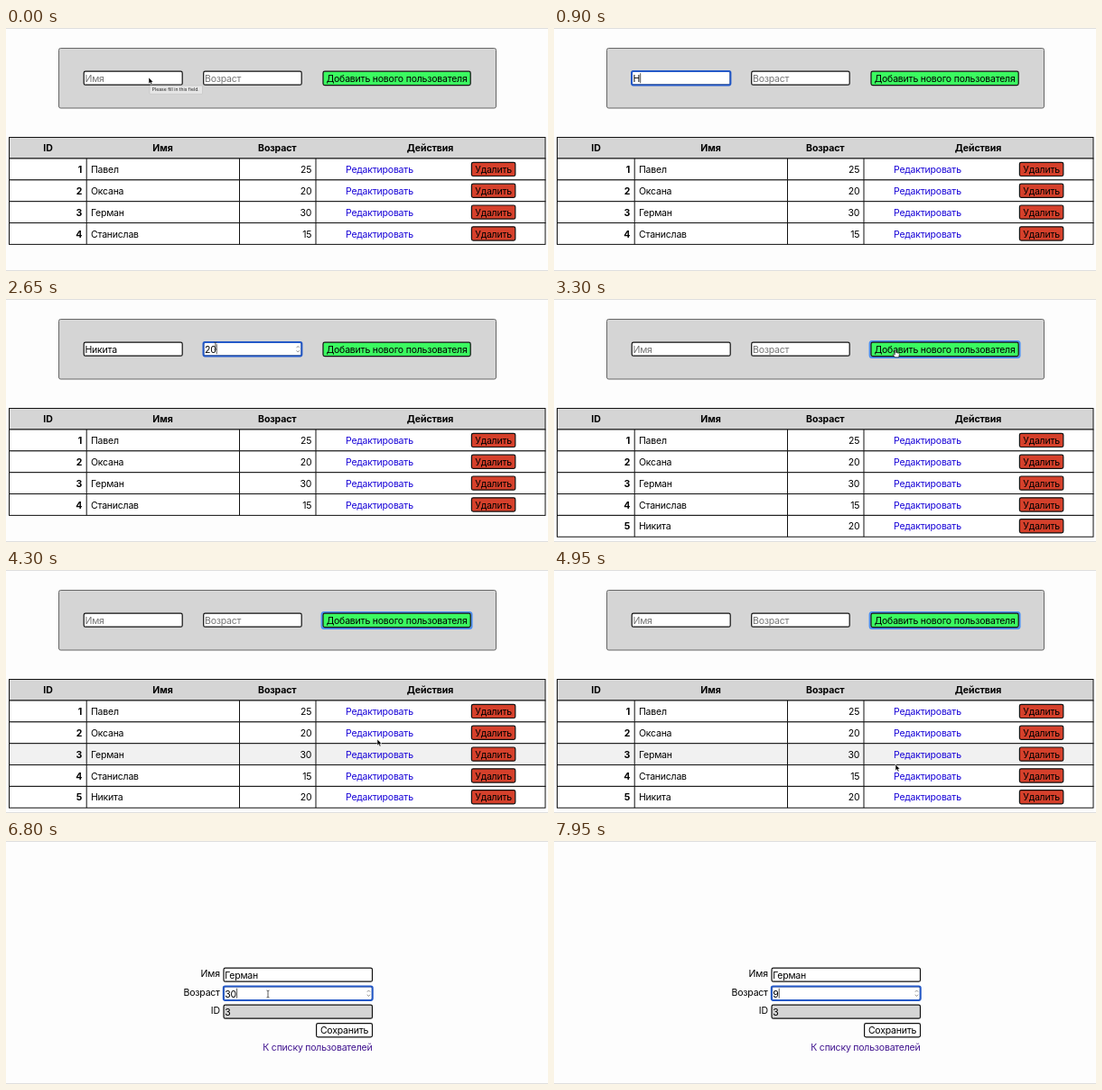
Write an HTML page that moves like this. It is 600 px wide and 270 px high and loops after 8 s.

```html
<!DOCTYPE html>
<html lang="ru">
<head>
<meta charset="utf-8">
<title>Список пользователей</title>
<style>
html, body { margin: 0; width: 100%; height: 100%; overflow: hidden; background: #fdfdfd; }
svg { display: block; width: 100%; height: 100%; }
text { font: 10.5px Inter, "Liberation Sans", sans-serif; letter-spacing: -.02em; fill: #000; white-space: pre; }
.bold { font-weight: 700; letter-spacing: -.01em; }
.hint { fill: #757575; }
.link { fill: #1a06d8; }
.visited { fill: #40148f; }
.tip { font-size: 5.1px; letter-spacing: 0; fill: #222; }
</style>
</head>
<body>
<svg id="stage" viewBox="0 0 600 270"></svg>
<script>
const LOOP = 8000;
const USERS = [["Павел", 25], ["Оксана", 20], ["Герман", 30], ["Станислав", 15], ["Никита", 20]];
const NEW_NAME = USERS[4][0];
const TOP = 145, ROW = 23.85;
const GREY = "#d5d5d5", RING = "#2459c8";

const stage = document.getElementById("stage");

function add(parent, tag, attrs, content) {
  const el = document.createElementNS("http://www.w3.org/2000/svg", tag);
  for (const k in attrs) el.setAttribute(k, attrs[k]);
  if (content !== undefined) el.textContent = content;
  parent.appendChild(el);
  return el;
}
const group = parent => add(parent, "g", {});
const label = (parent, x, y, s, cls = "", anchor = "start") =>
  add(parent, "text", { x, y, class: cls, "text-anchor": anchor }, s);
const box = (parent, x, y, width, height, fill, stroke = "none", weight = 1.2, rx = 1.8) =>
  add(parent, "rect", { x, y, width, height, fill, stroke, "stroke-width": weight, rx });
const line = (parent, x1, y1, x2, y2, stroke = "#111", weight = 1) =>
  add(parent, "line", { x1, y1, x2, y2, stroke, "stroke-width": weight });
const show = (el, on) => el.setAttribute("visibility", on ? "visible" : "hidden");

function button(parent, x, y, w, h, fill, s) {
  box(parent, x, y, w, h, fill, "#111");
  label(parent, x + w / 2, y + 11.7, s, "", "middle");
}

// An input with value, hint, focus ring, caret and optional number arrows.
function field(parent, x, y, w, hint, fill = "#fff") {
  const h = 15;
  box(parent, x, y, w, h, fill, "#111");
  const ring = box(parent, x - .2, y - .2, w + .4, h + .4, "none", RING, 2);
  const hintText = label(parent, x + 1.3, y + 11.8, hint, "hint");
  const text = label(parent, x + 1.3, y + 11.8, "");
  const caret = line(parent, 0, y + 2, 0, y + 13, "#111", .7);
  const sx = x + w - 4, sy = y + 7.5;
  const arrows = add(parent, "path", {
    d: `M${sx - 1.6} ${sy - 1.5}l1.6 -1.8l1.6 1.8M${sx - 1.6} ${sy + 1.5}l1.6 1.8l1.6 -1.8`,
    fill: "none", stroke: "#777", "stroke-width": .8
  });
  return (value, focus, caretOn, arrowsOn) => {
    if (text.textContent !== value) text.textContent = value;
    show(hintText, !value);
    show(ring, focus);
    show(caret, caretOn);
    show(arrows, arrowsOn);
    if (caretOn) {
      const cx = x + 1.9 + (value ? text.getComputedTextLength() : 0);
      caret.setAttribute("x1", cx);
      caret.setAttribute("x2", cx);
    }
  };
}

box(stage, 0, 0, 600, 270, "#fdfdfd", "none", 0, 0);
line(stage, 0, .5, 600, .5, "#dedede");
line(stage, 0, 269.5, 600, 269.5, "#dedede");

// List page
const list = group(stage);
box(list, 58.5, 22.5, 484, 66.5, GREY, "#666", 1, 2);
const nameField = field(list, 86.2, 48.2, 109, "Имя");
const ageField = field(list, 218.7, 48.2, 108.5, "Возраст");
const buttonRing = box(list, 349.6, 46.9, 166, 18, "none", "#4c8ff0", 2, 2.5);
button(list, 351, 48.2, 163.2, 15.4, "#3bfa60", "Добавить нового пользователя");

box(list, 3.5, 121.5, 593.5, TOP - 121.5, GREY, "#111", 1, 0);
[["ID", 46.5], ["Имя", 173.5], ["Возраст", 300.3], ["Действия", 469.5]]
  .forEach(([s, x]) => label(list, x, 137.2, s, "bold", "middle"));

const rows = USERS.map(([name, age], i) => {
  const g = group(list), y = TOP + i * ROW, base = y + 16;
  const back = box(g, 3.5, y, 593.5, ROW, "#fff", "#111", 1, 0);
  [89.2, 258.5, 343].forEach(x => line(g, x, y, x, y + ROW));
  label(g, 84.3, base, i + 1, "bold", "end");
  label(g, 94, base, name);
  label(g, 338.3, base, age, "", "end");
  label(g, 376, base, "Редактировать", "link");
  button(g, 515.4, y + 4.3, 48.4, 15.2, "#d5402b", "Удалить");
  return { g, back };
});

const tooltip = group(list);
box(tooltip, 159, 64, 58.5, 9.3, "#e6e6e6", "#bbb", .5, .5);
label(tooltip, 161.7, 70.4, "Please fill in this field.", "tip");

// Edit page
const edit = group(stage);
["Имя", "Возраст", "ID"].forEach((s, i) => label(edit, 236.8, 151.2 + i * 20.5, s, "", "end"));
const editName = field(edit, 241, 141.2, 164.5, "");
const editAge = field(edit, 241, 161.7, 164.5, "");
const editId = field(edit, 241, 182.2, 164.5, "", GREY);
button(edit, 343.6, 202.7, 61.9, 15.2, "#fff", "Сохранить");
label(edit, 405.5, 233.3, "К списку пользователей", "visited", "end");

// Pointer shapes, each with its hot spot at 0,0
const pointer = group(stage);
const shapes = {
  arrow: add(pointer, "path", {
    d: "M0 0V7L1.6 5.5L2.7 8L4 7.4L2.9 5H5Z", fill: "#000", stroke: "#fff", "stroke-width": .5
  }),
  hand: add(pointer, "path", {
    d: "M-.7 .6Q0 -.5 .7 .6V3L3.6 3.7Q4.6 4 4.3 5.3L3.6 8.3H-.6L-2.7 5.3Q-2.9 4.2 -1.9 4.5L-.7 5.4Z",
    fill: "#fff", stroke: "#222", "stroke-width": .7
  }),
  beam: add(pointer, "path", {
    d: "M-1.5 -4Q0 -4 0 -3Q0 -4 1.5 -4M0 -3V3M-1.5 4Q0 4 0 3Q0 4 1.5 4",
    fill: "none", stroke: "#333", "stroke-width": .8
  })
};

// Pointer path: time, x, y
const PATH = [
  [0, 158, 55], [1650, 158, 55], [1880, 225, 52], [2600, 225, 52], [3000, 378, 56.5],
  [3500, 378, 56.5], [3950, 413, 200], [4300, 411, 188], [4600, 396, 205], [4950, 378, 216],
  [5450, 404, 206], [5900, 404, 206], [6450, 290, 170], [LOOP, 290, 170]
];

function pointerAt(t) {
  const i = PATH.findIndex(p => p[0] > t);
  const [t0, x0, y0] = PATH[i - 1], [t1, x1, y1] = PATH[i];
  const u = (t - t0) / (t1 - t0), e = u * u * (3 - 2 * u);
  return [x0 + (x1 - x0) * e, y0 + (y1 - y0) * e];
}

const inside = (x, y, l, t, r, b) => x >= l && x <= r && y >= t && y <= b;

function pointerKind(x, y, editing) {
  if (editing) {
    if (inside(x, y, 343, 202, 406, 218)) return "hand";
    return inside(x, y, 241, 141, 406, 177) ? "beam" : "arrow";
  }
  if (inside(x, y, 351, 48, 514, 64)) return "hand";
  if (inside(x, y, 86, 48, 195, 63) || inside(x, y, 218, 48, 327, 63)) return "beam";
  const dy = (y - TOP) % ROW;
  return y > TOP && x >= 376 && x <= 451 && dy > 6 && dy < 19 ? "hand" : "arrow";
}

const between = (t, a, b) => t >= a && t < b;
const typed = (s, times, t) => s.slice(0, times.filter(k => t >= k).length);

function hoverRow(t, y) {
  if (t >= 3950) return 2;
  return t > 3500 && y > TOP ? Math.min(2, Math.floor((y - TOP) / ROW)) : -1;
}

function draw(t) {
  const editing = t >= 5700, sent = t >= 3150;
  const [x, y] = pointerAt(t);
  list.style.display = editing ? "none" : "";
  edit.style.display = editing ? "" : "none";

  if (editing) {
    const focus = t >= 6650;
    const age = t < 6850 ? "30" : t < 7050 ? "3" : t < 7850 ? "" : "9";
    editName(USERS[2][0], false, false, false);
    editAge(age, focus, focus, focus || inside(x, y, 241, 161, 406, 177));
    editId("3", false, false, false);
  } else {
    const name = sent ? "" : typed(NEW_NAME, [800, 1050, 1250, 1450, 1550, 1650], t);
    const age = sent ? "" : typed("20", [2350, 2500], t);
    const ageFocus = between(t, 2150, 3150);
    nameField(name, between(t, 500, 2150), between(t, 500, 1850), false);
    ageField(age, ageFocus, ageFocus, ageFocus || inside(x, y, 218, 48, 327, 63));
    show(buttonRing, sent);
    tooltip.setAttribute("opacity", Math.max(0, Math.min(1, (300 - t) / 260)));
    const hot = hoverRow(t, y);
    rows.forEach(({ g, back }, i) => {
      back.setAttribute("fill", i === hot ? "#f1f1f1" : "#fff");
      g.style.display = i < 4 || sent ? "" : "none";
    });
  }

  // The pointer hides while typing.
  const hidden = between(t, 800, 1650) || between(t, 2350, 2600) || t >= 6850;
  const kind = t < 450 ? "arrow" : pointerKind(x, y, editing);
  for (const k in shapes) show(shapes[k], !hidden && k === kind);
  pointer.setAttribute("transform", `translate(${x.toFixed(2)} ${y.toFixed(2)})`);
}

const start = performance.now();
function tick() {
  draw((performance.now() - start) % LOOP);
  requestAnimationFrame(tick);
}
tick();
</script>
</body>
</html>
```
